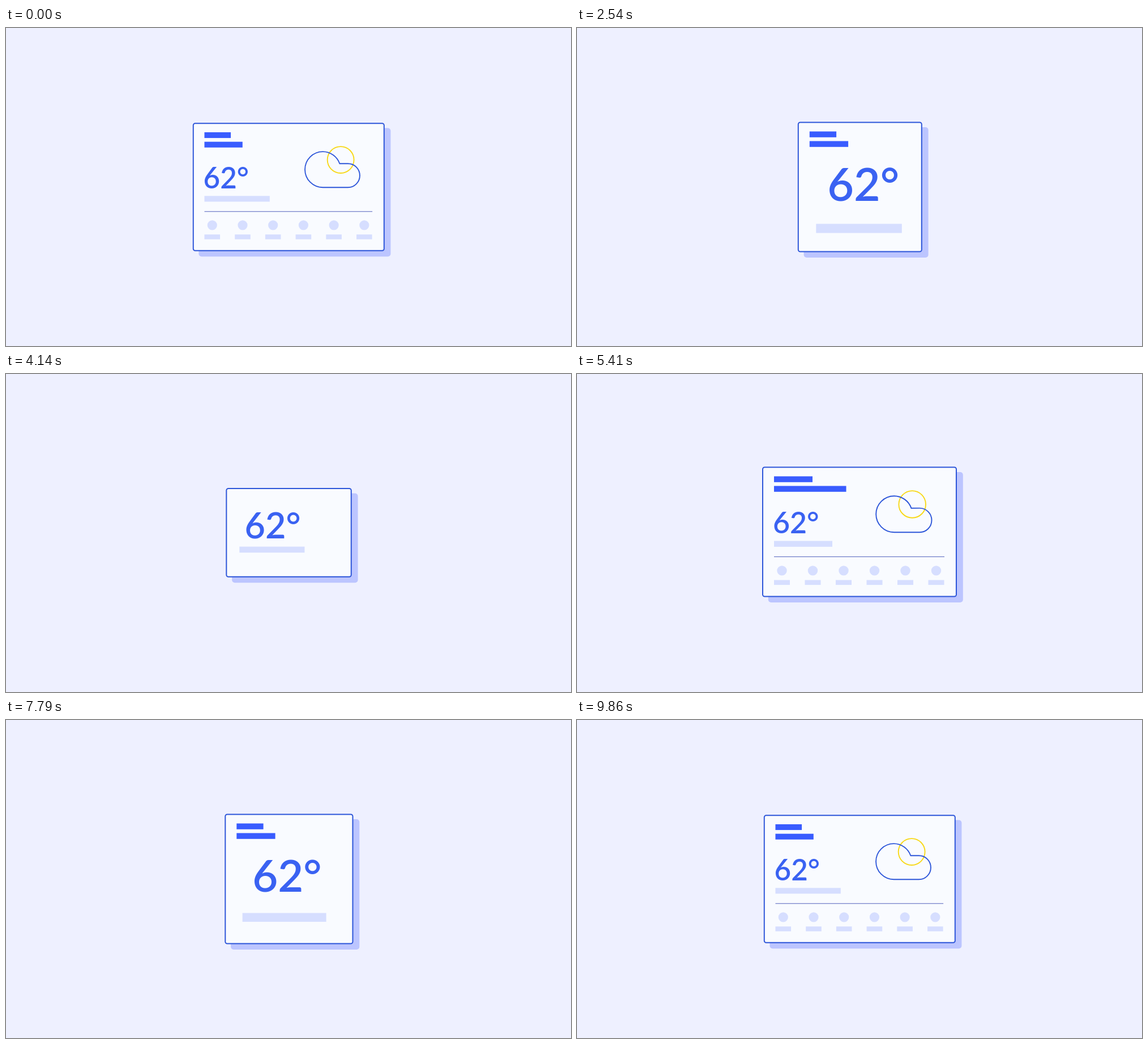
An HTML page with a canvas for the animation above (9.9 s loop, 998 px wide and 561 px high).

```html
<!DOCTYPE html>
<html lang="en">
<head>
<meta charset="utf-8">
<title>Responsive weather card</title>
<style>
html, body { margin: 0; width: 100%; height: 100%; overflow: hidden; background: #eef0ff; }
canvas { display: block; width: 998px; height: 561px; }
</style>
</head>
<body>
<canvas id="stage" role="img" aria-label="Weather card, 62°"></canvas>
<script>
const W = 998, H = 561, LOOP = 9900, MOVE = 680;
const canvas = document.getElementById('stage');
const ctx = canvas.getContext('2d');
const ratio = window.devicePixelRatio || 1;
canvas.width = W * ratio;
canvas.height = H * ratio;

const BLUE = '#2d56d9', TITLE = '#395cff', INK = '#3a62f2';
const PALE = '#d6deff', SUN = '#f8d816', RULE = '#6b78c6';

// Offsets are measured from the card's top left corner.
const wide = {
  w: 342, h: 228, cx: 499.3, cy: 280.5,
  textX: 20, base: 116.7, textW: 72,
  barX: 20, barY: 130, barW: 117, barH: 10.3,
  title1: 47.3, title2: 68.3, titleA: 1,
  icons: 6, iconA: 1, rule: 301,
  cloudGap: 43.5, cloudY: 50.7, cloudA: 1
};
const medium = { ...wide, w: 288, cx: 500.8, icons: 5, rule: 246, cloudGap: 20 };
const square = {
  ...medium, w: 218, cx: 499.8,
  textX: 54.4, base: 138.7, textW: 112,
  barX: 31.5, barY: 179, barW: 151.5, barH: 16.1,
  icons: 2.5, iconA: -0.7, rule: 84, cloudY: 43.7, cloudA: -1.35
};
const small = {
  ...square, w: 168.3, h: 124.7, cx: 499.8,
  textX: 40.3, base: 76, textW: 94,
  barX: 24.3, barY: 90.7, barW: 120.3, barH: 10.7, titleA: -1
};
const wideLong = { ...wide, cx: 499, cy: 278.5, barW: 103, title1: 68, title2: 127.5 };

const moves = [
  [450, medium], [1420, square], [2560, small], [3890, wideLong],
  [5450, small], [6430, square], [7650, medium], [8800, wide]
];

const clamp = v => Math.max(0, Math.min(1, v));
const ease = u => (1 - Math.cos(Math.PI * clamp(u))) / 2;

function mix(a, b, p) {
  const out = {};
  for (const key in a) out[key] = a[key] + (b[key] - a[key]) * p;
  return out;
}

function poseAt(t) {
  let pose = wide;
  for (const [start, next] of moves) {
    if (t <= start) break;
    pose = mix(pose, next, ease((t - start) / MOVE));
  }
  return pose;
}

function press(t, start, span) {
  const u = ((t - start + LOOP) % LOOP) / span;
  return u < 1 ? Math.min(1, 1.3 * Math.sin(Math.PI * u)) : 0;
}

function box(x, y, w, h, color) {
  ctx.fillStyle = color;
  ctx.fillRect(x, y, w, h);
}

function rounded(x, y, w, h, r) {
  ctx.beginPath();
  ctx.roundRect(x, y, w, h, r);
}

function weather(x, y) {
  ctx.lineWidth = 1.9;
  ctx.strokeStyle = SUN;
  ctx.beginPath();
  ctx.arc(x + 64, y + 14.7, 23.8, 0, Math.PI * 2);
  ctx.stroke();

  ctx.strokeStyle = BLUE;
  ctx.beginPath();
  ctx.arc(x + 32, y + 32, 32, Math.PI / 2, Math.PI * 2 - 0.335);
  ctx.lineTo(x + 77, y + 21.4);
  ctx.arc(x + 77, y + 42.7, 21.3, -Math.PI / 2, Math.PI / 2);
  ctx.closePath();
  ctx.stroke();
}

function forecast(s) {
  const alpha = clamp(s.iconA);
  ctx.globalAlpha = alpha;
  box(20, 157.3, s.rule, 1.2, RULE);
  for (let i = 0; i < 6; i++) {
    const x = 20 + i * 54.5;
    ctx.globalAlpha = alpha * clamp(s.icons - i);
    ctx.fillStyle = PALE;
    ctx.beginPath();
    ctx.arc(x + 14, 182.4, 8.7, 0, Math.PI * 2);
    ctx.fill();
    box(x, 199, 28, 8.6, PALE);
  }
}

function card(s) {
  ctx.translate(s.cx - s.w / 2, s.cy - s.h / 2);
  rounded(9.8, 8.5, s.w + 2, s.h + 2, 5);
  ctx.fillStyle = '#bcc5ff';
  ctx.fill();
  rounded(0, 0, s.w, s.h, 3.5);
  ctx.fillStyle = '#f9fbff';
  ctx.fill();

  ctx.save();
  ctx.clip();
  forecast(s);
  ctx.globalAlpha = clamp(s.cloudA);
  weather(s.w - s.cloudGap - 98.3, s.cloudY);
  ctx.globalAlpha = clamp(s.titleA);
  box(20, 16, s.title1, 10.3, TITLE);
  box(20, 33, s.title2, 10.3, TITLE);
  ctx.globalAlpha = 1;
  box(s.barX, s.barY, s.barW, s.barH, PALE);

  ctx.font = `600 ${s.textW * 0.72}px Lato, sans-serif`;
  ctx.fillStyle = INK;
  const inset = ctx.measureText('62°').actualBoundingBoxLeft;
  ctx.fillText('62°', s.textX + inset, s.base);
  ctx.restore();

  rounded(0, 0, s.w, s.h, 3.5);
  ctx.lineWidth = 2;
  ctx.strokeStyle = BLUE;
  ctx.stroke();
}

function draw(t) {
  ctx.setTransform(ratio, 0, 0, ratio, 0, 0);
  box(0, 0, W, H, '#eef0ff');
  const s = poseAt(t);
  const scale = 1 - 0.0145 * (press(t, 9760, 340) + press(t, 5140, 260));
  ctx.translate(s.cx, s.cy);
  ctx.scale(scale, scale);
  ctx.translate(-s.cx, -s.cy);
  card(s);
}

const began = performance.now();
function tick() {
  draw((performance.now() - began) % LOOP);
  requestAnimationFrame(tick);
}
tick();
</script>
</body>
</html>
```
